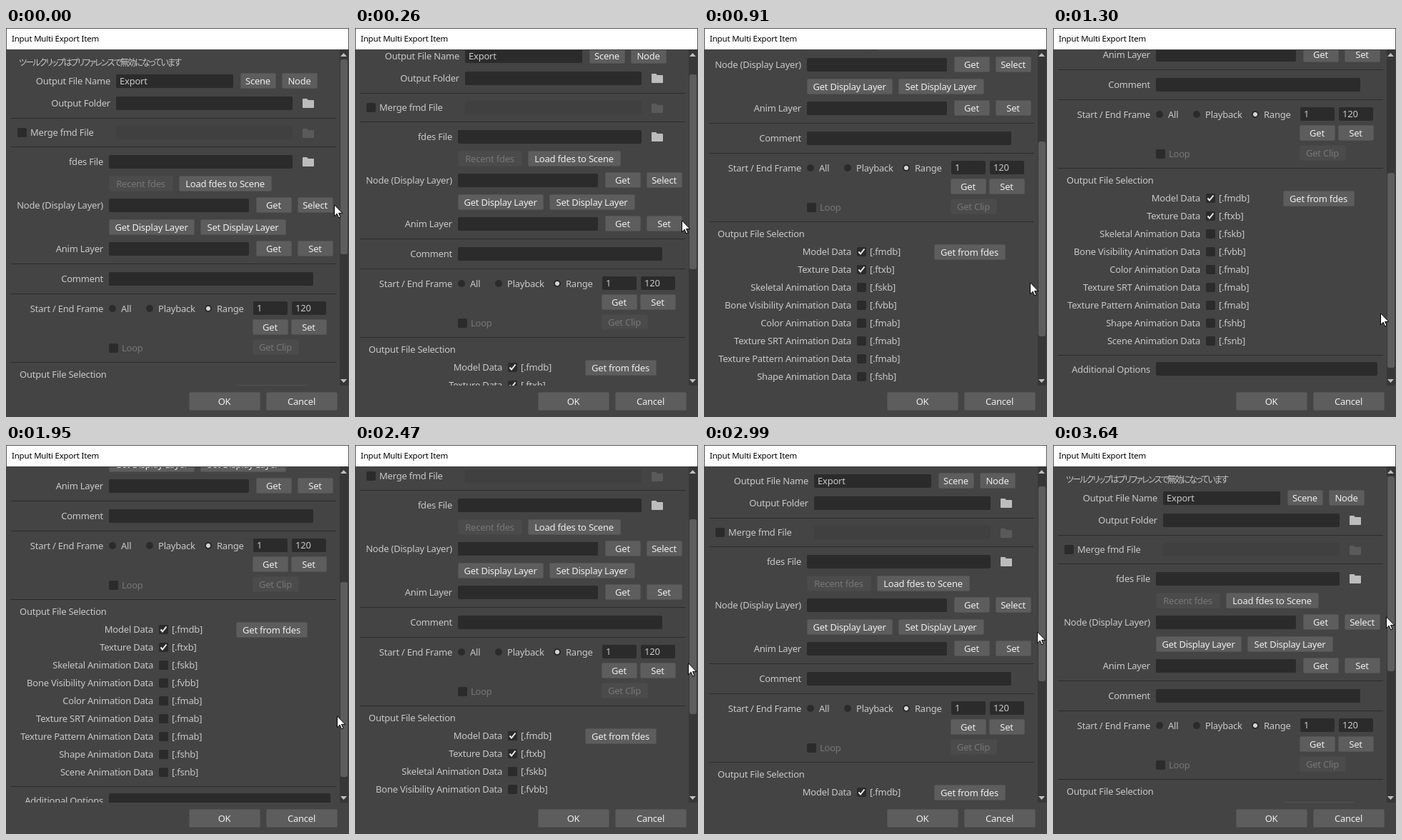
An HTML page for the animation above (3.77 s loop, 480 by 545 pixels).

```html
<!DOCTYPE html>
<html lang="en">
<head>
<meta charset="utf-8">
<title>Export dialog</title>
<style>
html, body { margin: 0; width: 100%; height: 100%; overflow: hidden; background: #444; }
#stage { position: absolute; left: 0; top: 0; width: 480px; height: 545px; overflow: hidden; background: #444;
  font: 13px/20px "Noto Sans", "DejaVu Sans", sans-serif; letter-spacing: -.23px; color: #c8c8c8; }
#stage *, #stage { box-sizing: border-box; }
#stage div, #stage svg { position: absolute; white-space: pre; }
#title { left: 0; top: 0; width: 480px; height: 30px; background: #fff; border: 1px solid #555; border-bottom: 0;
  padding-left: 7px; font-size: 11.5px; line-height: 28px; letter-spacing: -.2px; color: #000; }
#view { left: 0; top: 31px; width: 466px; height: 470px; overflow: hidden; }
#page { left: 0; top: -31px; width: 466px; height: 791px; }
#track { left: 467px; top: 30px; width: 12px; height: 471px; background: #373737; }
#thumb { left: 468px; top: 44px; width: 10px; height: 273px; border-radius: 3px; background: #5d5d5d; }
.field { background: #2b2b2b; border-radius: 2px; padding-left: 5px; color: #c8c8c8; }
.field.off { background: #404040; }
.button { background: #5d5d5d; border: 1px solid #535353; border-radius: 2px; color: #eee; text-align: center; padding-right: 1px; }
.button.off { background: #4b4b4b; border-color: #484848; color: #777; }
.rule { left: 7px; width: 455px; height: 1px; background: #2b2b2b; }
.dim { color: #777; }
.hint { font: 12px/20px "Noto Sans CJK JP", "Noto Sans CJK", sans-serif; font-feature-settings: "palt"; letter-spacing: -1.8px; }
.box { width: 13px; height: 13px; background: #2b2b2b; border-radius: 2px; }
.radio { width: 10px; height: 10px; border-radius: 50%; background: #2b2b2b; }
.radio.on { background: radial-gradient(circle, #d4d4d4 2.6px, #2b2b2b 3.5px); }
</style>
</head>
<body>
<div id="stage">
  <div id="title">Input Multi Export Item</div>
  <div id="view"><div id="page"></div></div>
  <div id="track"></div>
  <div id="thumb"></div>
  <svg style="left:467px;top:30px" width="12" height="471" fill="#b4c6b4">
    <path d="M1 10L5.5 5L10 10ZM1 462L5.5 467L10 462Z"/>
  </svg>
  <svg id="cursor" style="left:0;top:0" width="14" height="21">
    <path d="M.5 .8V16.8L4.2 13.2L6.7 19L9 18L6.6 12.4H11.8Z" fill="#fff" stroke="#000"/>
  </svg>
</div>
<script>
const $ = id => document.getElementById(id);
const stage = $("stage"), page = $("page"), thumb = $("thumb"), cursor = $("cursor");

function add(cls, style, text = "", parent = page) {
  const el = document.createElement("div");
  el.className = cls;
  for (const k in style) el.style[k] = style[k] + "px";
  el.textContent = text;
  parent.append(el);
  return el;
}
// Every helper takes the vertical centre of its row.
const text = (x, y, s, cls = "") => add(cls, { left: x, top: y - 10 }, s);
const label = (right, y, s) => add("", { right: 466 - right, top: y - 10 }, s);
const field = (x1, x2, y, s = "", off = "") =>
  add("field " + off, { left: x1, top: y - 9, width: x2 - x1, height: 19, lineHeight: 18 }, s);
const button = (x1, x2, y, s, off = "", h = 22, parent = page) =>
  add("button " + off, { left: x1, top: y - h / 2, width: x2 - x1, height: h, lineHeight: h - 2 }, s, parent);
const rule = y => add("rule", { top: y });
const radio = (x, y, s, on = "") => {
  add("radio " + on, { left: x - 5, top: y - 5 });
  text(x + 12, y, s);
};
const svg = (x, y, w, h, path) => page.insertAdjacentHTML("beforeend",
  `<svg style="left:${x}px;top:${y}px" width="${w}" height="${h}">${path}</svg>`);
const folder = (y, color = "#bdbdbd") =>
  svg(415, y - 6, 16, 13, `<path fill="${color}" d="M0 1Q0 0 1 0H6L8 2H15Q16 2 16 3V12Q16 13 15 13H1Q0 13 0 12Z"/>`);
const check = (x, y, on) => {
  add("box", { left: x, top: y - 6 });
  if (on) svg(x, y - 6, 13, 13, '<path d="M2.5 6.5L5 9.5L10.5 2.5" fill="none" stroke="#eee" stroke-width="2"/>');
};

text(18, 48, "ツールクリップはプリファレンスで無効になっています", "hint");
label(146, 74, "Output File Name");
field(154, 318, 74, "Export");
button(328, 378, 74, "Scene");
button(386, 436, 74, "Node");
label(146, 105, "Output Folder");
field(154, 401, 105);
folder(105);
rule(126);
check(16, 146, false);
text(34, 146, "Merge fmd File");
field(154, 401, 146, "", "off");
folder(147, "#5a5a5a");
rule(166);

label(136, 187, "fdes File");
field(144, 401, 187);
folder(187);
button(144, 234, 218, "Recent fdes", "off");
button(242, 372, 218, "Load fdes to Scene");
label(136, 248, "Node (Display Layer)");
field(144, 340, 248);
button(350, 400, 248, "Get");
button(408, 458, 248, "Select");
button(144, 264, 279, "Get Display Layer");
button(272, 392, 279, "Set Display Layer");
label(136, 309, "Anim Layer");
field(144, 340, 309);
button(350, 400, 309, "Get");
button(408, 458, 309, "Set");
rule(330);
label(136, 351, "Comment");
field(144, 430, 351);
rule(372);

label(136, 393, "Start / End Frame");
radio(149, 393, "All");
radio(201, 393, "Playback");
radio(283, 393, "Range", "on");
field(346, 394, 392, "1");
field(400, 448, 392, "120");
button(345, 395, 419, "Get");
button(399, 449, 419, "Set");
check(144, 448, false);
text(162, 448, "Loop", "dim");
button(345, 410, 447, "Get Clip", "off");
rule(468);

text(19, 485, "Output File Selection");
button(322, 422, 511, "Get from fdes");
[["Model", "fmdb"], ["Texture", "ftxb"], ["Skeletal Animation", "fskb"], ["Bone Visibility Animation", "fvbb"],
 ["Color Animation", "fmab"], ["Texture SRT Animation", "fmab"], ["Texture Pattern Animation", "fmab"],
 ["Shape Animation", "fshb"], ["Scene Animation", "fsnb"]].forEach(([name, ext], i) => {
  const y = 510 + 25 * i;
  label(206, y, name + " Data");
  check(214, y, i < 2);
  text(232, y, `[.${ext}]`);
});
rule(730);
label(136, 750, "Additional Options");
field(144, 454, 749);

button(256, 356, 523, "OK", "", 26, stage);
button(364, 464, 523, "Cancel", "", 26, stage);

// Drag path: step, scroll, cursor x, cursor y
const STEP = 130, STEPS = 29, MAX_SCROLL = 290;
const path = [
  [0, 0, 459, 247], [2, 35, 457, 269], [7, 197, 456, 356], [11, 284, 459, 406],
  [15, 252, 463, 379], [19, 103, 466, 305], [23, 24, 466, 261], [28, 0, 466, 240]
];
const slope = (i, k) => {
  const a = path[i - 1], b = path[i + 1];
  return a && b ? (b[k] - a[k]) / (b[0] - a[0]) : 0;
};
function sample(step, k) {
  let i = 0;
  while (i < path.length - 2 && path[i + 1][0] <= step) i++;
  const a = path[i], b = path[i + 1], h = b[0] - a[0], u = (step - a[0]) / h, v = 1 - u;
  return Math.round(v * v * (1 + 2 * u) * a[k] + u * u * (3 - 2 * u) * b[k]
    + h * u * v * (v * slope(i, k) - u * slope(i + 1, k)));
}

const start = performance.now();
function draw() {
  const step = Math.floor((performance.now() - start) / STEP) % STEPS;
  const scroll = Math.max(0, Math.min(MAX_SCROLL, sample(step, 1)));
  page.style.transform = `translateY(${-scroll}px)`;
  thumb.style.transform = `translateY(${Math.round(scroll * .586)}px)`;
  cursor.style.transform = `translate(${sample(step, 2)}px, ${sample(step, 3)}px)`;
  requestAnimationFrame(draw);
}
draw();
</script>
</body>
</html>
```
